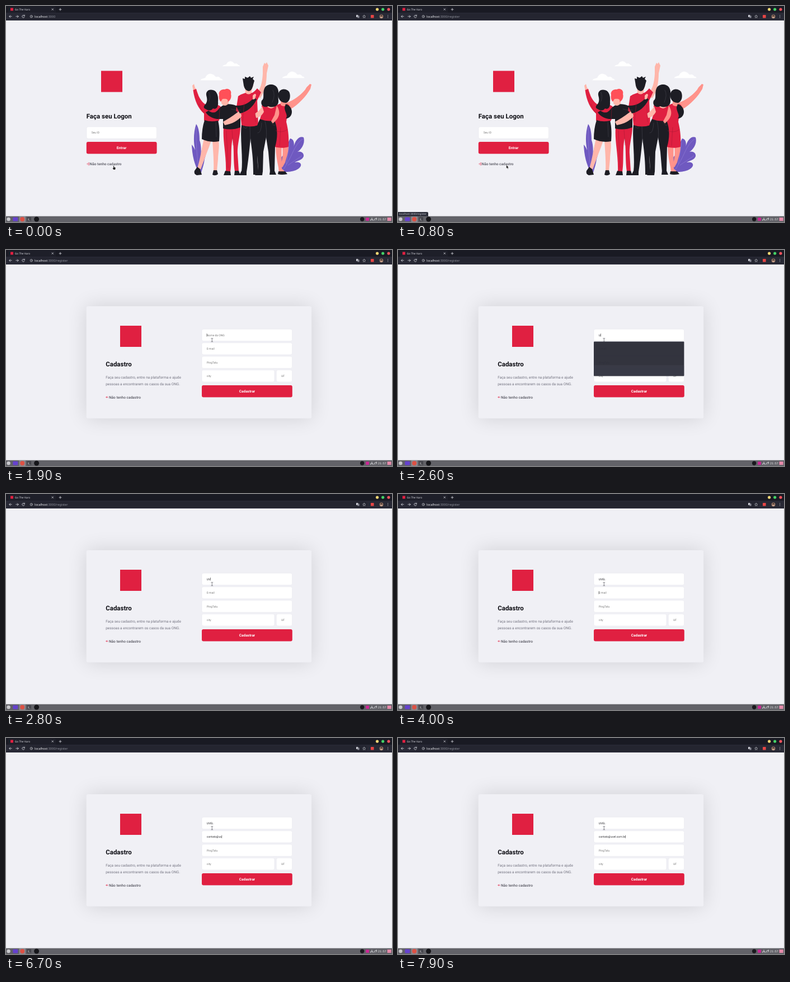
An HTML page for the animation above (8000 ms loop, 690 by 388 pixels).

```html
<!DOCTYPE html>
<html lang="pt">
<head>
<meta charset="utf-8">
<title>Cadastro</title>
<style>
  html, body { margin: 0; width: 100%; height: 100%; overflow: hidden; background: #f0f0f5; }
  svg { display: block; width: 100vw; height: 100vh; }
  text { font-family: Roboto, Arial, sans-serif; text-rendering: geometricPrecision; white-space: pre; }
  .ui { font-family: "Noto Sans", "Open Sans", sans-serif; }
  .clock { font-family: "DejaVu Sans Mono", monospace; }
  .h { font-size: 11.5px; font-weight: 700; fill: #0c0c12; }
  .p { font-size: 6.47px; fill: #737380; }
  .link { font-size: 6.47px; font-weight: 500; fill: #55555f; }
  .btn { font-size: 6.47px; font-weight: 700; fill: #fff; text-anchor: middle; }
  .field { font-size: 5.03px; fill: #757575; }
  .field.typed { fill: #26262b; }
  .box { fill: #fff; stroke: #dcdce6; stroke-width: .36; }
  .red { fill: #e02041; }
  .ink { fill: #1d1d24; }
  .skin { fill: #ffb6aa; }
  .coral { fill: #ff938b; }
  .line { fill: none; stroke-linecap: round; stroke-linejoin: round; }
</style>
</head>
<body>
<svg id="stage" viewBox="0 0 690 388" preserveAspectRatio="none">
  <defs>
    <filter id="soft" x="-30%" y="-50%" width="160%" height="200%"><feGaussianBlur stdDeviation="18"/></filter>
    <path id="cloud" d="M0 12C2 8 7 9 9 7C11 2 16-1 21 1C25 2 26 5 28 6C33 4 36 8 36 9C39 9 40 11 40 12Z" fill="#fff"/>
  </defs>
  <rect width="690" height="388" fill="#f0f0f5"/>

  <g id="logon">
    <rect class="red" x="170" y="116.5" width="38" height="38"/>
    <text class="h" x="143.7" y="202.3">Faça seu Logon</text>
    <rect class="box" x="144" y="217" width="125.4" height="21.2" rx="2.9"/>
    <text class="field" x="152.7" y="229.3">Seu ID</text>
    <rect class="red" x="143.8" y="244" width="125.8" height="21.5" rx="2.9"/>
    <text class="btn" x="206.5" y="257">Entrar</text>
    <path class="line" d="M144.4 283.7h3m-1.3-1.4 1.4 1.4-1.4 1.4M147.2 281.4h1.5v4.6h-1.5" stroke="#e02041" stroke-width=".5"/>
    <text class="link" x="149.6" y="286">Não tenho cadastro</text>

    <g id="art">
      <use href="#cloud" transform="translate(387 99) scale(.78)"/>
      <use href="#cloud" transform="translate(347.5 121.5)"/>
      <use href="#cloud" transform="translate(493.5 117.5)"/>

      <g fill="#6f59c0">
        <path d="M345 298C341 285 336 272 338 258C335 246 335 226 340 212C345 219 346 231 346 241C350 252 348 263 349 272L347 298Z"/>
        <path d="M347 298C346 278 349 254 357 236C361 246 359 263 355 275C354 284 351 292 349 299Z"/>
        <path d="M345 299C340 291 333 275 332 249C340 258 342 271 343 281Z"/>
        <path d="M490 297C487 282 490 271 497 267C501 261 502 248 508 238C515 239 516 248 514 254C517 241 524 233 532 236C535 246 529 257 521 262C527 260 533 264 532 270C530 277 520 278 516 281C524 279 530 283 526 289C519 298 505 298 495 298Z"/>
      </g>
      <g class="line" stroke="#9b88dc" stroke-width=".5">
        <path d="M345 297Q339 257 340 218M348 297Q352 270 358 241M494 297Q506 278 513 262T530 239M501 284L507 245M504 286L529 269"/>
      </g>

      <!-- woman in the dress -->
      <path class="coral" d="M482 250L493 252C492 266 493 278 493 292L499 298L488 299L487 290C484 276 482 264 482 250ZM494 252L505 252C505 263 501 273 499 281L494 290L491 286C495 275 495 263 494 252Z"/>
      <path class="coral" d="M500 174C513 171 527 160 535 150C538 144 541 143 543 140L546 141L544 149C536 163 522 178 506 187Z"/>
      <path class="red" d="M480 181C488 174 500 172 506 178C510 186 502 197 501 208C505 224 506 239 505 253C497 256 485 255 477 252L479 207Z"/>
      <path class="coral" d="M491 165h11v13q-5 4-11 0Z"/>
      <path class="ink" d="M487 157C489 148 501 147 506 154C510 162 507 173 500 174C490 174 485 165 487 157Z"/>
      <path class="ink" d="M500 176C506 178 511 183 511 190C511 197 506 202 500 202C505 196 498 191 498 182Z"/>
      <path class="ink" d="M487 297L499 297L503 302Q492 304 486 302Z"/>

      <!-- woman on the left -->
      <path class="skin" d="M354 238L367 241C363 255 358 265 354 277L348 293L342 292C347 276 349 259 354 238ZM369 241L380 241C382 254 379 265 379 275L377 296L371 296C372 281 370 258 369 241Z"/>
      <path class="skin" d="M340 164C336 156 334 150 333 143L336 140L338 147L340 149L344 160Z"/>
      <path class="red" d="M334.5 151L340 149C343 160 348 172 357 177C365 174 377 175 384 181L386 193L380 207Q366 211 354 206L354 193C344 185 337 170 334.5 151Z"/>
      <path class="ink" d="M355 205Q366 209 379 206C382 217 382 231 381 243Q364 246 350 239Q350 220 355 205Z"/>
      <path class="skin" d="M362 169h10v11q-5 5-10 0Z"/>
      <path class="ink" d="M358 160C357 152 364 149 370 151C378 153 380 163 379 172C380 181 376 187 370 184C366 190 360 187 355 184C352 181 355 178 357 176C361 170 359 165 358 160Z"/>
      <path class="ink" d="M342 289L347 293L350 303L341 304Q335 301 337 296ZM371 295L377 295L379 302Q374 306 369 303Z"/>

      <!-- red-haired friend -->
      <path class="red" d="M389 218L419 217C419 232 413 250 414 265L416 297H409C406 278 408 254 405 238C401 257 404 278 401 298H393C394 267 387 242 389 218Z"/>
      <path class="ink" d="M381 184C388 176 400 174 411 179C425 179 435 173 444 164L448 168C441 181 431 190 419 194L419 218Q404 224 388 220L388 203L377 203C367 201 361 197 357 191L362 188C369 193 375 193 381 184Z"/>
      <path class="skin" d="M384 161h14v14q-7 8-13 0Z"/>
      <path d="M381 160C379 153 386 149 391 150C398 146 404 153 402 158C404 165 400 171 396 172C398 167 393 166 387 167L384 172C381 169 380 164 381 160Z" fill="#ff5058"/>
      <path class="ink" d="M392 296L401 297L402 304H389ZM409 296L416 296L419 304H408Z"/>

      <!-- man in the middle -->
      <path class="skin" d="M447 158C455 150 458 138 459 122L459 109L462 102L464 104L466 101L469 107L466 121C466 137 463 154 454 166Z"/>
      <path class="ink" d="M421 212L451 211C452 233 447 260 451 297L442 299C442 274 439 255 437 238C435 260 433 279 430 298L421 298C424 270 418 239 421 212Z"/>
      <path class="red" d="M415 162Q421 158 428 156L440 156Q444 154 449 148L456 155L449 170L451 214Q436 219 421 214L419 195L411 188Z"/>
      <path class="skin" d="M419 187C411 193 402 200 393 205L388 208L391 214C404 212 415 206 421 198Z"/>
      <path class="skin" d="M426 139h15l1 5-2 2-1 10q-5 5-11 0l-1-10-2-2Z"/>
      <path class="ink" d="M425 143L423 130L427 131L427 127L432 129L436 126L438 129L443 127L441 131L444 134L441 145Q439 152 434 153Q427 152 425 143Z"/>
      <path class="ink" d="M421 296L430 297L430 304H417ZM442 296L451 296L453 303H442Z"/>
      <path class="ink" d="M411 179C425 180 435 174 444 164L448 168C441 182 431 190 418 193Z"/>
      <path class="skin" d="M441 161Q446 155 447 160L445 167L441 168Z"/>

      <!-- woman in front -->
      <path class="ink" d="M454 203L479 204C486 217 486 236 481 253L480 297L472 298L469 262L465 236L460 262L459 298L450 298C452 275 446 256 446 239C446 224 449 212 454 203Z"/>
      <path class="red" d="M457 179C464 175 476 175 485 179L486 190L480 206Q466 208 454 203L457 193Z"/>
      <path class="skin" d="M458 180C454 187 449 191 445 193L447 201C454 200 458 196 461 190Z"/>
      <path class="coral" d="M484 179C490 188 490 197 483 205L477 211L474 207L480 196Z"/>
      <path class="skin" d="M467 171h13v10q-6 6-13 0Z"/>
      <path class="ink" d="M462 148C466 139 480 139 485 147C489 154 486 161 487 170C488 180 477 184 469 180C461 184 454 178 457 170C463 166 458 157 462 148Z"/>
      <path class="ink" d="M450 296L459 297L458 304H445ZM472 296L480 296L483 303H471Z"/>

      <g class="line" stroke="#a31733" stroke-width=".5">
        <path d="M354 193Q349 187 345 176M382 184L381 204M404 222L406 250M394 224L397 291M426 174L423 207M445 177L446 208M482 224Q493 229 503 222M489 251L491 218"/>
      </g>
      <g class="line" stroke="#4a4a55" stroke-width=".5">
        <path d="M375 209L376 235M402 185Q411 188 419 187M436 216L437 245M424 216Q427 222 431 218M463 207Q467 222 465 240M474 208Q477 216 481 214M450 228Q456 229 457 210M363 171Q366 162 363 155M477 151Q482 160 476 173"/>
      </g>
    </g>
  </g>

  <g id="register">
    <rect x="144" y="101" width="402" height="201.5" rx="2.9" opacity=".13" filter="url(#soft)"/>
    <rect x="143.7" y="101" width="402.5" height="201.5" rx="2.9" fill="#f0f0f5"/>
    <rect class="red" x="204" y="136" width="38" height="38"/>
    <text class="h" x="178.2" y="208.8">Cadastro</text>
    <text class="p" x="178.2" y="231">Faça seu cadastro, entre na plataforma e ajude</text>
    <text class="p" x="178.2" y="242.5">pessoas a encontrarem os casos da sua ONG.</text>
    <path class="line" d="M182.3 264.4h-3.3m1.5-1.5-1.5 1.5 1.5 1.5" stroke="#e02041" stroke-width=".7"/>
    <text class="link" x="184" y="266.7">Não tenho cadastro</text>
    <g id="fields"></g>
    <rect class="red" x="350" y="242.9" width="161.8" height="21.5" rx="2.9"/>
    <text class="btn" x="431" y="255.9">Cadastrar</text>
    <rect id="caret" width=".5" height="5.6" fill="#222"/>
    <g id="popup">
      <rect x="350" y="164.5" width="161.4" height="62" rx="1" fill="#2b2c37"/>
      <rect x="350.3" y="207" width="160.8" height="19" rx="1" fill="#31333f"/>
    </g>
  </g>

  <g id="browser">
    <rect width="690" height="12.5" fill="#191a23"/>
    <path d="M2 12.5Q4 12 4 10V3Q4 1 6 1H87Q89 1 89 3V10Q89 12 91 12.5Z" fill="#1e1f29"/>
    <rect y="12" width="690" height="14" fill="#282935"/>
    <rect x="31" y="13.6" width="615" height="10.4" rx="5.2" fill="#242530"/>
    <rect class="red" x="8" y="3.5" width="5" height="5"/>
    <text class="ui" x="15.8" y="7.9" font-size="4.7" fill="#e6e6ec">Go The Vuro</text>
    <g class="line" stroke="#d9dae0" stroke-width=".8">
      <path d="M82 4.8l2.6 2.6m0-2.6-2.6 2.6M95 6.2h4m-2-2v4"/>
      <path d="M10.2 18.8H5.8m2-2-2 2 2 2M17.8 18.8h4.4m-2-2 2 2-2 2M33 17.4a2.3 2.3 0 1 0 .2 2.3M33.3 16v1.8h-1.8"/>
      <circle cx="45.3" cy="18.8" r="2.2" stroke-width=".6"/><path d="M45.3 18.6v1.2M45.3 17.6v.1" stroke-width=".6"/>
      <path d="M640.3 16.3l.8 1.7 1.8.2-1.3 1.3.3 1.9-1.6-.9-1.7.9.4-1.9-1.4-1.3 1.9-.2Z" stroke-width=".55"/>
    </g>
    <text class="ui" x="51" y="20.6" font-size="5.5" fill="#f0f0f4">localhost<tspan id="path" fill="#92949f">:3000</tspan></text>
    <rect x="626" y="16" width="3.4" height="4" fill="#c9cad2"/><rect x="628.4" y="17.4" width="3.2" height="4" fill="#888a96"/>
    <rect x="652" y="16" width="5.6" height="5.6" rx=".6" fill="#e64545"/>
    <circle cx="671" cy="18.7" r="3.5" fill="#8d6f60"/><path d="M668.2 20.8Q671 17.8 673.8 20.8Q671 23.6 668.2 20.8Z" fill="#c9a28c"/><circle cx="671" cy="17.6" r="1.3" fill="#4a3831"/>
    <g fill="#d9dae0"><circle cx="682.7" cy="16.7" r=".55"/><circle cx="682.7" cy="18.7" r=".55"/><circle cx="682.7" cy="20.7" r=".55"/></g>
    <circle cx="663.6" cy="6.1" r="2.6" fill="#f7d774"/><circle cx="673.7" cy="6.1" r="2.6" fill="#45d267"/><circle cx="684" cy="6.1" r="2.6" fill="#f4525d"/>
  </g>

  <g id="status">
    <path d="M0 370H52Q54 370 54 372V378H0Z" fill="#2b2d39"/>
    <text class="ui" x="1.8" y="375.4" font-size="4.55" fill="#c8c9d0">localhost:3000/register</text>
  </g>

  <g id="taskbar">
    <rect y="377.6" width="690" height="10.4" fill="#626268"/>
    <rect x="23.5" y="378" width="11.5" height="10" fill="#88888e"/>
    <circle cx="4.6" cy="383" r="3.2" fill="#c9c9cd"/>
    <rect x="12.4" y="379.6" width="8.8" height="6.8" rx="1" fill="#6541cf"/>
    <circle cx="29.2" cy="383" r="4" fill="#dd5144"/>
    <rect x="37.5" y="379.2" width="7.6" height="7.6" rx="1" fill="#45454c"/>
    <text x="39" y="385" font-size="4.5" fill="#eee">$_</text>
    <circle cx="54.6" cy="383" r="4.5" fill="#16161a"/>
    <circle cx="636.7" cy="383" r="3.7" fill="#19191d"/>
    <rect x="643.3" y="380.2" width="5.6" height="5.6" fill="#cf2596"/>
    <path class="line" d="M654 380.8v2m-2.2 2.6v-1.6h4.4v1.6M659.2 385v-2.5l3.2-1.7v3.3" stroke="#e5e5e8" stroke-width=".9"/>
    <text class="clock" x="665" y="384.7" font-size="4.9" fill="#f2f2f4">21:57</text>
    <rect x="681.6" y="380" width="7" height="6" fill="#e58aaa"/>
  </g>

  <g id="cursor">
    <path id="hand" d="M-.8-3.2Q0-4 .5-3V-.7L2.6-.2Q3.3.2 3.1 1.3L2.5 3.8H-.5L-2.1 1.2Q-2-.1-.8 1Z" fill="#111" stroke="#fff" stroke-width=".35"/>
    <path id="arrow" d="M-1-2.6V3.4L.4 2.2 1.5 4.4 2.5 3.9 1.5 1.8 3.3 1.6Z" fill="#111" stroke="#fff" stroke-width=".35"/>
    <path id="beam" class="line" d="M-1.4-3.2Q0-3.2 0-2.5Q0-3.2 1.4-3.2M0-2.5V2.5M-1.4 3.2Q0 3.2 0 2.5Q0 3.2 1.4 3.2" stroke="#55555c" stroke-width=".7"/>
  </g>
</svg>
<script>
  const $ = id => document.getElementById(id);
  const LOOP = 8000, STEP = 100;
  const fields = [
    ['Nome da ONG', 350, 142.2, 161.6],
    ['E-mail', 350, 166.7, 161.6],
    ['PingTalu', 350, 191.1, 161.6],
    ['city', 350, 215.6, 130],
    ['UF', 483.3, 215.6, 28.3]
  ];
  const typing = [
    { text: 'UVEL', keys: [2600, 2800, 3100, 3200] },
    { text: 'contato@uvel.com.br', keys: [4900, 4900, 5000, 5000, 5100, 5100, 5200, 5500,
      6700, 6700, 6800, 6800, 7300, 7400, 7500, 7600, 7800, 7800, 7900] }
  ];

  $('fields').innerHTML = fields.map(([label, x, y, w]) =>
    `<rect class="box" x="${x}" y="${y}" width="${w}" height="21.3" rx="2.9"/>
     <text class="field" x="${x + 8.8}" y="${y + 12.5}">${label}</text>`).join('');
  const labels = $('fields').querySelectorAll('text');

  const show = (id, on) => $(id).setAttribute('visibility', on ? 'visible' : 'hidden');
  const ramp = (t, a, b) => Math.min(1, Math.max(0, (t - a) / (b - a)));
  const ease = k => k * k * (3 - 2 * k);

  function drawFields(t) {
    typing.forEach(({ text, keys }, i) => {
      const typed = text.slice(0, keys.filter(k => k <= t).length);
      labels[i].textContent = typed || fields[i][0];
      labels[i].classList.toggle('typed', typed !== '');
    });
    const active = t >= 3600 ? 1 : 0;
    const label = labels[active];
    const width = label.classList.contains('typed') ? label.getComputedTextLength() : 0;
    $('caret').setAttribute('x', fields[active][1] + 8.8 + width);
    $('caret').setAttribute('y', fields[active][2] + 7.8);
    show('caret', t >= 1800);
    show('popup', t >= 2600 && t < 2800);
    $('popup').setAttribute('opacity', t < 2700 ? .96 : 1);
  }

  function drawCursor(t) {
    const near = ease(ramp(t, 100, 600)), far = ease(ramp(t, 800, 1400));
    const x = 192.7 + 2 * near + 173.6 * far;
    const y = 290.2 - 1.8 * near - 126.7 * far;
    const kind = t < 800 ? 'hand' : x > 350 && y < 237 ? 'beam' : 'arrow';
    ['hand', 'arrow', 'beam'].forEach(id => show(id, id === kind));
    $('cursor').setAttribute('transform', `translate(${x} ${y})`);
  }

  function draw(time) {
    const t = Math.floor(time % LOOP / STEP) * STEP;
    const registered = t >= 900;
    show('logon', !registered);
    show('register', registered);
    $('path').textContent = t >= 800 ? ':3000/register' : ':3000';
    $('status').setAttribute('opacity', ramp(t, 100, 400) * (1 - ramp(t, 1000, 1300)));
    drawFields(t);
    if (!registered) ['caret', 'popup'].forEach(id => show(id, false));
    drawCursor(t);
  }

  const start = performance.now();
  function tick() {
    draw(performance.now() - start);
    requestAnimationFrame(tick);
  }
  tick();
</script>
</body>
</html>
```
